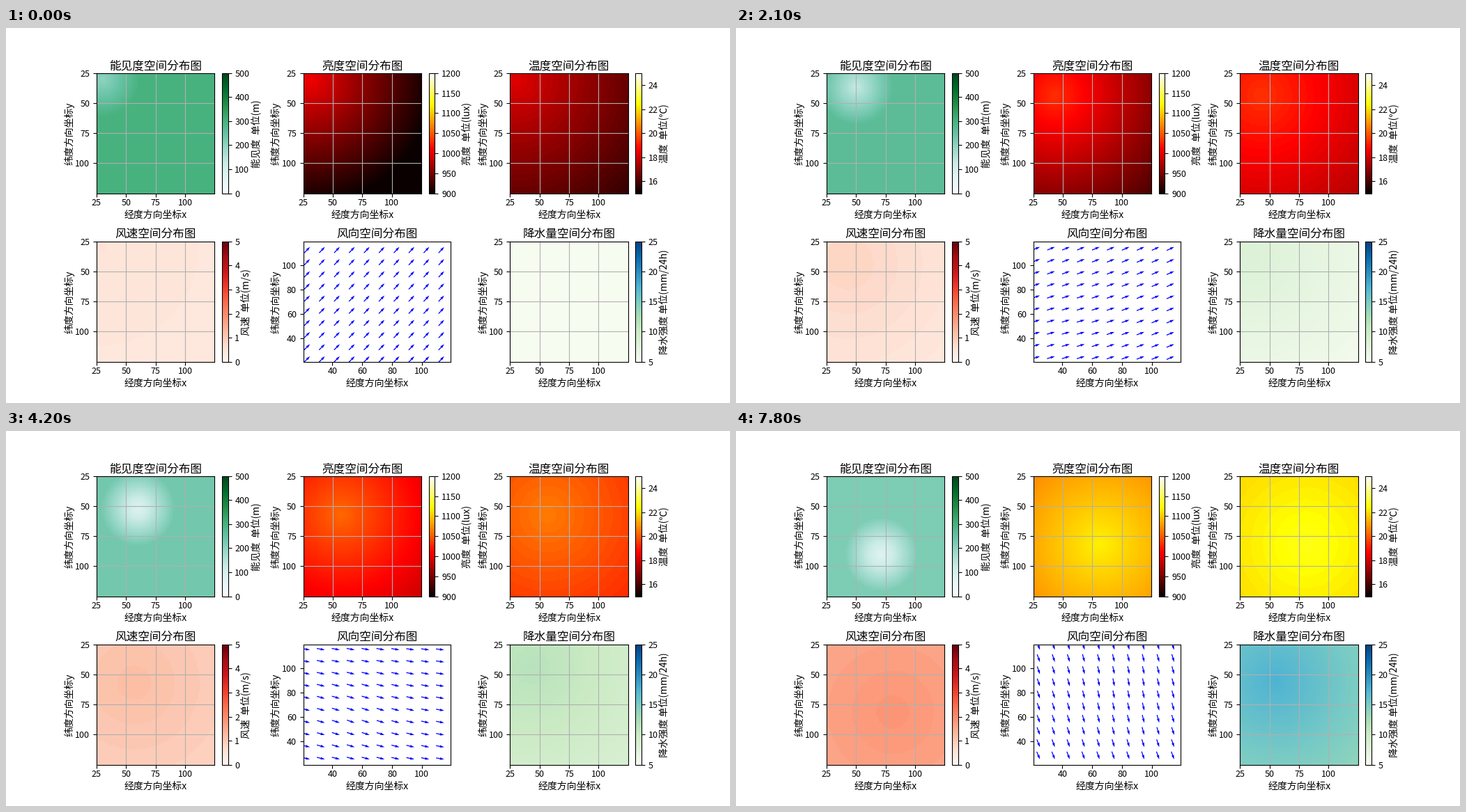
A matplotlib script for the animation above (8000 ms loop, 1039 px wide and 539 px high).

```python
import numpy as np
import matplotlib.pyplot as plt
from matplotlib.animation import FuncAnimation

W, H, DPI = 1039, 539, 100
FRAMES, INTERVAL = 80, 100

plt.rcParams["font.family"] = ["Noto Sans CJK JP", "DejaVu Sans"]
plt.rcParams["font.size"] = 10

fig, axes = plt.subplots(2, 3, figsize=(W / DPI, H / DPI), dpi=DPI)
fig.subplots_adjust(left=0.125, right=0.9, bottom=0.11, top=0.88,
                    wspace=0.4, hspace=0.4)

cells = np.arange(100) + 25.5
GX, GY = np.meshgrid(cells, cells)
QX, QY = np.meshgrid(np.arange(25, 116, 10), np.arange(25, 116, 10))


def dist(cx, cy, x=GX, y=GY):
    return np.hypot(x - cx, y - cy)


def along(k, *points):
    """Walk evenly through the points, ten steps per leg."""
    leg, step = divmod(k, 10)
    a, b = points[leg], points[leg + 1]
    return a + (b - a) * step / 9


def centre(k):
    return along(k, 30, 50, 70, 90)


def visibility(k):
    cx = along(k, 30, 60, 60, 80)
    cy = along(k, 30, 40, 75, 102)
    core = along(k, 200, 100, 50, 100)
    rim = along(k, 300, 250, 200, 240)
    return core + (rim - core) * np.minimum(dist(cx, cy) / 31, 1)


def brightness(k):
    c = centre(k)
    peak = along(k, 1004, 1044, 1080, 1148)
    return peak - along(k, 1.0, 0.82, 0.52, 0.62) * dist(c, c)


def temperature(k):
    c = centre(k)
    peak = along(k, 18.2, 20, 21.5, 23.6)
    return peak - along(k, 0.019, 0.014, 0.01, 0.01) * dist(c, c)


def wind_speed(k):
    c = centre(k)
    return 0.55 + 0.052 * k - min(0.0038, 0.001 + 0.0005 * k) * dist(c, c)


def rain(k):
    c = 30 + k
    return 5 + 0.5 * k - (0.015 + 0.0009 * k) * dist(c, c)


def wind_angle(k):
    c = centre(k)
    turn = min(0.16, 0.02 + 0.014 * k)
    return np.radians(45 - 5 * k + turn * dist(c, c, QX, QY))


def label(x, y, text, rotation=0):
    fig.text(x / W, 1 - y / H, text, rotation=rotation,
             ha="center", va="center")


def style(ax, title, xmid, ymid, left):
    ax.set_title(title, fontsize=12, pad=4.3)
    ax.tick_params(labelsize=9)
    ax.tick_params(axis="x", pad=1.8)
    label(xmid, ymid + 117, "经度方向坐标x")
    label(left, ymid, "纬度方向坐标y", 90)


def heatmap(ax, field, title, cmap, ticks, lim, bar_text, xmid, ymid, left, bar_x):
    im = ax.imshow(field(0), cmap=cmap, vmin=lim[0], vmax=lim[1],
                   extent=(25, 125, 125, 25), aspect="auto",
                   interpolation="nearest")
    ax.set_xticks(range(25, 101, 25))
    ax.set_yticks(range(25, 101, 25))
    ax.grid(True, color="#b0b0b0", lw=0.8)
    bar = fig.colorbar(im, ax=ax, ticks=ticks)
    bar.ax.tick_params(labelsize=9)
    style(ax, title, xmid, ymid, left)
    label(bar_x, ymid + 0.5, bar_text, 90)
    return im, field


reds = plt.get_cmap("Reds").resampled(64)
hot = plt.get_cmap("hot").resampled(100)
TOP, LOW = 151.5, 393.5

maps = [
    heatmap(axes[0, 0], visibility, "能见度空间分布图", "BuGn",
            range(0, 501, 100), (0, 500), "能见度  单位(m)",
            215, TOP, 91.3, 358.3),
    heatmap(axes[0, 1], brightness, "亮度空间分布图", "hot",
            range(900, 1201, 50), (900, 1200), "亮度  单位(lux)",
            512, TOP, 387.3, 660.8),
    heatmap(axes[0, 2], temperature, "温度空间分布图", hot,
            range(16, 25, 2), (15, 25), "温度  单位(℃)",
            809, TOP, 684.8, 944),
    heatmap(axes[1, 0], wind_speed, "风速空间分布图", reds,
            range(6), (0, 5), "风速  单位(m/s)",
            215, LOW, 91.3, 344.8),
    heatmap(axes[1, 2], rain, "降水量空间分布图", "GnBu",
            range(5, 26, 5), (5, 25), "降水强度 单位(mm/24h)",
            809, LOW, 684.8, 944),
]

ax = axes[1, 1]
arrows = ax.quiver(QX, QY, np.cos(wind_angle(0)), np.sin(wind_angle(0)),
                   color="blue", pivot="tip", scale=18)
ax.set(xlim=(20.5, 119.5), ylim=(20.5, 119.5),
       xticks=range(40, 101, 20), yticks=range(40, 101, 20))
style(ax, "风向空间分布图", 533, LOW, 387.3)


def draw(i):
    k = max(0, i // 3 - 1)  # the first state holds twice as long
    for im, field in maps:
        im.set_data(field(k))
    angle = wind_angle(k)
    arrows.set_UVC(np.cos(angle), np.sin(angle))
    return [im for im, _ in maps] + [arrows]


anim = FuncAnimation(fig, draw, frames=FRAMES, interval=INTERVAL,
                     repeat=True, repeat_delay=0)
plt.show()
```
